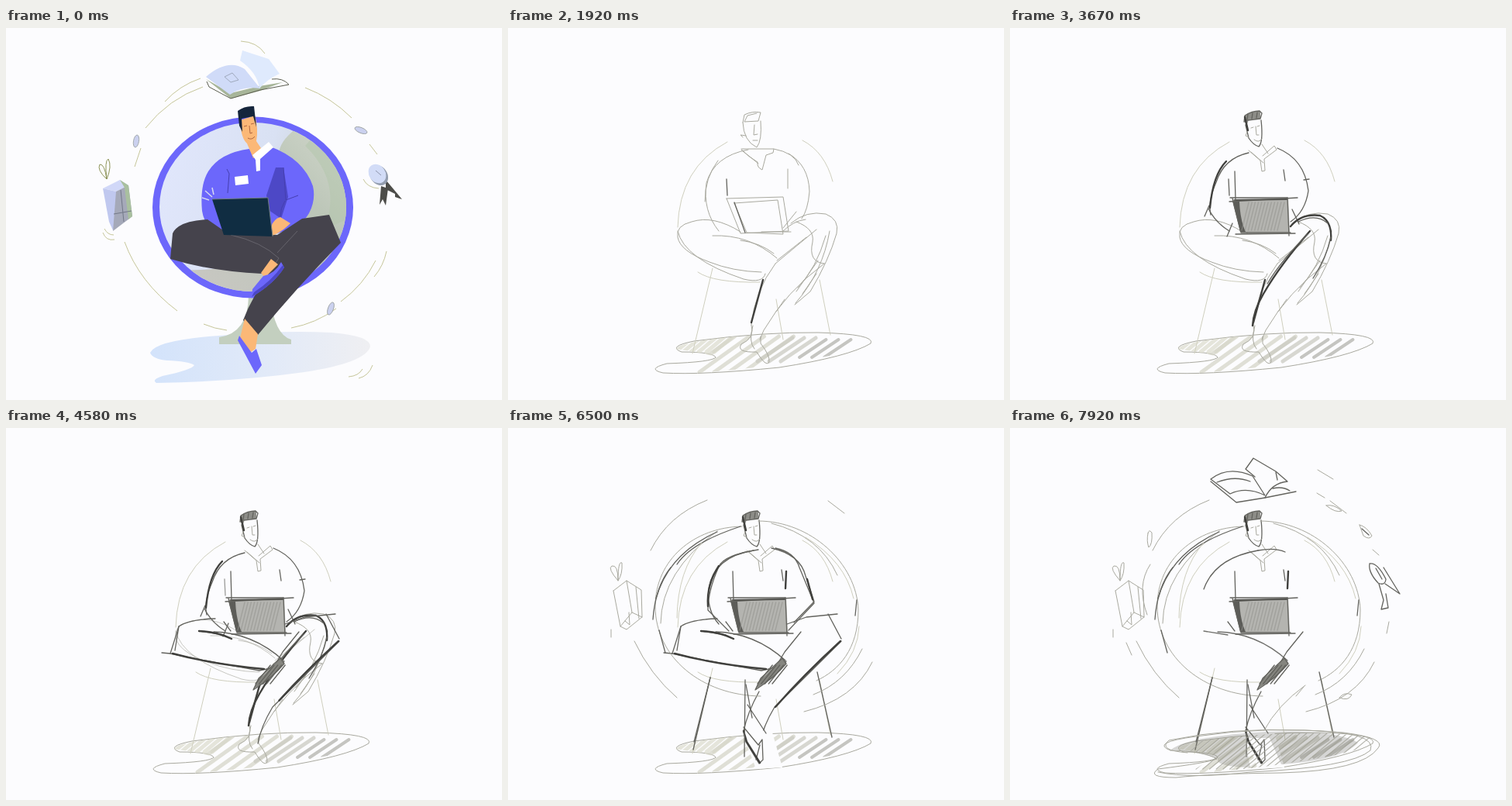
These frames come from a looping animation (640 by 480 pixels, 8 s). An HTML page:

```html
<!DOCTYPE html>
<html lang="en">
<head>
<meta charset="utf-8">
<title>From sketch to illustration</title>
<style>
  html, body { margin: 0; width: 100%; height: 100%; overflow: hidden; background: #fcfcfe; }
  svg { display: block; width: 100%; height: 100%; }
  #sketch path { fill: none; stroke-linecap: round; stroke-linejoin: round; }
  .trail { fill: none; stroke: #c6c69a; stroke-width: 1; }
  .blue { fill: #6c67fb; }
  .skin { fill: #fbb877; }
  .trousers { fill: #45434c; }
</style>
</head>
<body>
<svg viewBox="0 0 640 480">
  <defs>
    <linearGradient id="seatFill" x2="1" y2=".25">
      <stop offset=".1" stop-color="#e0e6fb"/><stop offset=".6" stop-color="#d9e1f3"/><stop offset="1" stop-color="#c9ceca"/>
    </linearGradient>
    <linearGradient id="seatShade" x1="1" y1="0" x2="0" y2="1">
      <stop offset="0" stop-color="#d4d9ce"/><stop offset=".35" stop-color="#bcc6b8"/><stop offset="1" stop-color="#c9c7c3"/>
    </linearGradient>
    <linearGradient id="floorFill">
      <stop offset="0" stop-color="#d3e3fb"/><stop offset=".55" stop-color="#e2eaf8"/><stop offset="1" stop-color="#efeff2"/>
    </linearGradient>
    <clipPath id="floorClip"><path d="M215 414Q225 403 320 396Q400 390 465 399Q470 412 420 422Q330 440 230 446Q250 432 268 424Q245 418 215 414Z"/></clipPath>
    <clipPath id="seatClip"><ellipse cx="318.500" cy="231" rx="120.500" ry="109"/></clipPath>
  </defs>

  <g id="sketch"></g>

  <g id="picture">
    <!-- floor and chair -->
    <path fill="url(#floorFill)" d="M186 419Q193 403 275 397Q350 390 420 393Q470 397 470 411Q464 432 385 444Q300 456 194 458Q187 454 202 449Q240 441 243 435Q235 430 208 429Q189 427 186 419Z"/>
    <path fill="#c3cfbf" d="M313 346Q312 394 275 399V408H368V402Q346 396 341 346Z"/>
    <ellipse class="blue" cx="318.500" cy="231.500" rx="129.500" ry="117"/>
    <ellipse fill="url(#seatFill)" cx="318.500" cy="231" rx="120.500" ry="109"/>
    <g clip-path="url(#seatClip)">
      <path fill="url(#seatShade)" d="M374 130Q335 160 365 190Q400 230 350 275Q300 315 235 312L280 350H450V130Z"/>
      <path fill="#b4c6ae" opacity=".55" d="M386 152Q435 200 410 260L445 245Q445 180 392 145Z"/>
    </g>

    <!-- body -->
    <path class="blue" d="M314 156Q276 161 261 185Q250 203 253 236Q256 254 268 264L345 266Q380 259 391 239Q400 222 396 204Q384 169 341 153L322 170Z"/>
    <path fill="#4d48c6" d="M336 216L348 180H358L364 218L355 246L339 235Z"/>
    <path fill="none" stroke="#453fb0" d="M285 182L288 188L286 213M358 180L361 222L377 216M360 223Q354 232 354 243"/>
    <path fill="#fff" d="M295 192L312 190L313 201L296 203Z"/>
    <path fill="none" stroke="#d6d9f2" stroke-width="1.500" d="M253 219L262 222M257 210L266 218M266 206L268 215"/>
    <path class="trousers" d="M215 265Q222 249 260 247L283 263L350 267L382 246L417 241L432 277Q375 335 325 396L306 377Q318 345 340 318L330 317Q265 314 212 298Z"/>
    <path fill="none" stroke="#66646c" d="M290 267Q330 276 352 297L338 318M376 262L350 290"/>
    <path class="skin" d="M342 298L351 305L334 322L329 316Z"/>
    <path class="blue" d="M355 302L359 309Q346 330 317 347L318 337L332 320Q347 317 355 302Z"/>
    <path fill="#4d48c6" d="M359 309Q346 330 317 347L320 341Q343 326 357 306Z"/>
    <path class="skin" d="M308 375L325 395L322 414L316 418L302 400Z"/>
    <path class="blue" d="M301 397L317 419L323 414L330 435L322 446L299 403Z"/>
    <path class="skin" d="M340 264Q343 247 354 244L367 252Q355 264 343 268Z"/>
    <path fill="#102d42" d="M266 221L338 219L344 269L281 267Z"/>
    <path fill="none" stroke="#6f7c80" d="M266 221L338 219L344 269"/>

    <!-- head -->
    <path class="skin" d="M302 119L321 113Q326 130 323 146L331 158L319 168L311 149Q303 142 302 119Z"/>
    <path fill="#15253c" d="M299 107Q308 100 320 101L323 128L319 114L304 117L305 134L301 126Z"/>
    <path fill="none" stroke="#a85e3d" stroke-width=".9" d="M307 127L311 126M316 124L320 123M314 126L315 136L318 135M312 142Q317 145 321 140"/>
    <path fill="#fff" d="M318 164L339 147L345 154L328 169L328 184L323 185L322 170Z"/>

    <!-- orbiting things -->
    <path class="trail" d="M180 129Q210 91 254 76M205 95Q224 74 251 65M303 17Q324 18 334 33M386 77Q420 90 446 116M469 150L479 163M491 288Q487 307 475 321M477 300Q461 332 432 353M426 362Q400 381 368 387M153 276Q172 328 221 365M255 382Q269 388 285 390M174 155L166 179M125 264Q129 275 140 273M127 259Q131 267 139 267M442 450Q455 449 460 440M455 452Q468 449 473 435M461 195Q466 206 481 207"/>
    <path fill="#a7b599" d="M258 66L290 91L328 81L357 70L327 75L290 84Z"/>
    <path fill="#d0dbf8" d="M258 63Q286 39 308 53L328 78Q304 75 289 86Z"/>
    <path fill="#dfeafd" d="M305 29L339 40L353 59Q337 66 327 78Q324 57 302 42Z"/>
    <path fill="none" stroke="#5a5c4e" d="M259 69L262 76L290 91L328 80L365 73Q357 64 343 66"/>
    <path fill="none" stroke="#9fa9bd" d="M282 63L292 58L300 67L290 70Z"/>
    <path fill="#d1d8f8" d="M125 207L147 196L158 203L142 211Z"/>
    <path fill="#c0c8ef" d="M125 207L142 211L147 238L138 261L133 250Z"/>
    <path fill="#a5a9b9" d="M142 211L158 203L163 243L138 262Z"/>
    <path fill="#a9c09f" d="M147 196L158 203L163 243L158 247L153 206Z"/>
    <path fill="none" stroke="#727888" d="M148 209L152 250M139 240L162 236"/>
    <path fill="none" stroke="#8d9457" d="M130 195Q117 183 121 176Q127 175 130 195Q127 171 132 169Q137 178 130 195"/>
    <path fill="#4d4d49" d="M484 204L493 207L490 229L486 221L482 228ZM490 196L511 221L502 218L502 214L490 208Z"/>
    <ellipse fill="#949eaf" cx="481" cy="190" rx="11" ry="14" transform="rotate(-35 481 190)"/>
    <ellipse fill="#d2dcf7" cx="479" cy="188" rx="10.500" ry="13" transform="rotate(-35 479 188)"/>
    <path stroke="#8e95ab" d="M477 184L484 190"/>
    <g fill="#cbd1ef" stroke="#999f9f" stroke-width=".8">
      <ellipse cx="168" cy="146" rx="3.500" ry="8" transform="rotate(10 168 146)"/>
      <ellipse cx="458" cy="132" rx="8.500" ry="3.500" transform="rotate(22 458 132)"/>
      <ellipse cx="419" cy="362" rx="3.500" ry="8.500" transform="rotate(20 419 362)"/>
    </g>
  </g>
</svg>

<script>
const LOOP = 8000, NEVER = 9000;
const svgNS = 'http://www.w3.org/2000/svg';
const sheet = document.getElementById('sketch');
const picture = document.getElementById('picture');
const parts = [];
const clamp = v => Math.max(0, Math.min(1, v));

const pale = ['#cfcfbe', 1];
const grey = ['#a9a99f', 1];
const dark = ['#63635e', 1.3];
const bold = ['#40403d', 2.4];

function addPath(attributes, part) {
  const node = document.createElementNS(svgNS, 'path');
  for (const name in attributes) node.setAttribute(name, attributes[name]);
  sheet.append(node);
  parts.push({ node, ...part });
}

// Strokes of one group are drawn one after another between start and end.
function sketch(start, end, hide, [stroke, width], d, extra = {}) {
  const strokes = d.match(/M[^M]+/g);
  const slice = (end - start) / strokes.length;
  strokes.forEach((line, i) => addPath(
    { d: line, stroke, 'stroke-width': width, pathLength: 1, 'stroke-dasharray': '1 2', ...extra },
    { start: start + i * slice, span: slice, hide, drawn: true }));
}

function shade(start, end, hide, fill, d) {
  addPath({ d, style: 'fill:' + fill }, { start, span: end - start, hide });
}

// Parallel pencil strokes that lean to the right.
function hatch(x, y, width, height, count, lean = 1.2) {
  let d = '';
  for (let i = 0; i <= count; i++) {
    const left = x + width * i / count;
    d += `M${left} ${y + height}L${left + height * lean} ${y}`;
  }
  return d;
}

// Floor
const onFloor = { 'clip-path': 'url(#floorClip)', opacity: .75 };
const floorLine = 'M268 425Q266 418 224 418Q205 411 240 404Q330 392 400 393Q475 395 468 407Q440 424 350 438Q250 448 200 445Q178 440 205 433Q265 431 268 425';
sketch(1350, 1620, NEVER, grey, floorLine);
sketch(1550, 1750, NEVER, ['#dedecf', 5], hatch(216, 399, 50, 19, 5), onFloor);
sketch(1580, 1800, NEVER, ['#d6d6c8', 5], hatch(228, 398, 76, 46, 4, 1.4), onFloor);
sketch(1680, 1850, NEVER, ['#cbcbc2', 5], hatch(322, 400, 30, 30, 2, 1.5), onFloor);
sketch(1750, 1900, NEVER, ['#b3b3ad', 4], hatch(376, 402, 32, 23, 2, 1.5), onFloor);

// First loose figure
sketch(920, 1100, 2900, grey, 'M303 122Q304 146 321 154Q328 145 326 120M303 141L300 138L307 139M303 122L305 112Q315 107 326 109L323 120L305 121L309 113L321 110M318 125L317 138L322 137M316 145L322 145');
sketch(1040, 1190, 3050, grey, 'M301 156L324 156L343 156L342 161L333 164L328 183Q321 180 322 173Q310 166 301 157L323 175');
sketch(1080, 1250, 3200, grey, 'M310 157Q266 165 256 200Q251 236 272 262M271 171Q254 193 254 224M343 156Q370 161 375 177M362 162Q388 177 389 211Q387 235 379 246M361 182V207');
sketch(1180, 1300, 3100, grey, 'M282 220L355 218L362 262L300 265ZM292 226L348 222L355 266L308 264ZM327 263L365 263M355 262Q368 249 384 247M372 237L355 258');
sketch(1280, 1480, 4500, grey, 'M300 263Q265 241 237 250Q216 255 219 270Q222 288 260 302Q290 314 327 315M264 268Q311 266 347 297M219 262Q227 298 304 324Q329 330 332 317');
sketch(1320, 1520, 4600, grey, 'M365 252Q385 235 410 240Q428 247 424 265Q414 300 390 340L370 357M345 304Q318 340 314 383M408 304Q359 340 330 390L325 402M372 250Q396 259 393 276Q387 302 408 304');
sketch(1500, 1650, 4900, grey, 'M314 383Q319 400 301 408Q294 419 321 418Q333 438 337 431Q338 422 326 407L326 398M316 384Q310 405 318 414');
sketch(1200, 1500, NEVER, pale, 'M283 147Q221 180 219 257M380 145Q409 160 419 198M245 315Q265 329 325 328M264 310L238 420M346 350L355 402M402 325L416 396');
sketch(1700, 1850, 4500, dark, 'M282 195L283 216M292 225L306 264');
sketch(1720, 1850, 4500, grey, 'M345 304L398 260M347 300L385 270M300 274Q325 277 343 291');
sketch(1800, 1920, 4700, bold, 'M329 325Q321 354 314 380');
sketch(1830, 1915, 4600, grey, 'M415 262Q406 315 371 355M410 268Q398 310 374 335M400 300L372 340M357 350L346 366M398 317L380 343');

// Head and laptop
shade(2580, 2750, NEVER, '#8d8d88', 'M302 121L303 113Q313 107 323 107L323 117L308 118L306 124Z');
sketch(2580, 2850, NEVER, dark, 'M302 121L303 113Q312 107 322 107L325 110L323 117L307 119M304 125L308 142Q314 151 321 153Q327 147 324 119M307 111L306 119M313 110L312 117M319 109L318 116');
sketch(2600, 2750, NEVER, bold, 'M303 115L307 132');
sketch(2800, 2980, NEVER, grey, 'M311 129L314 128M319 127L322 126M317 127L318 138L321 138M315 144Q321 149 325 143M306 134L304 139L308 141M325 150L333 162');
sketch(2900, 3080, NEVER, grey, 'M308 158L323 171L325 185L329 184L328 169L344 157L341 152L326 165M311 160L327 174');
shade(3030, 3270, NEVER, '#b4b4b0', 'M287 221L359 220L361 264L298 264Z');
shade(3100, 3300, NEVER, '#5c5c58', 'M287 223L297 263L304 263Q297 248 296 224Z');
sketch(3000, 3300, NEVER, dark, 'M284 219L358 219M283 224L371 219M287 220L298 264L362 264M358 219L360 268M291 266L368 265');
sketch(3150, 3330, NEVER, ['#555551', 2], 'M290 222L357 221');
sketch(3150, 3320, NEVER, ['#92928e', 1.3], hatch(299, 225, 46, 36, 11, .25), { opacity: .6 });

// Darker outlines
sketch(3100, 3420, 4800, dark, 'M308 161Q276 168 266 199Q255 224 259 241M256 233Q265 251 283 262M345 155Q380 169 385 210Q381 237 362 250M364 234L373 253M379 196L386 195M257 229L251 243M287 252L280 269');
sketch(3200, 3400, 4800, bold, 'M279 172Q262 189 258 232');
sketch(3300, 3450, NEVER, dark, 'M290 185L291 222M353 183L355 197');
sketch(3350, 3600, 4650, bold, 'M362 256Q376 239 400 242Q416 249 414 274M387 262Q349 305 327 343Q314 365 313 384');
sketch(3450, 3620, 4650, dark, 'M414 270Q409 295 391 323M372 250Q395 239 410 252M384 266Q350 300 332 330');
sketch(3750, 4200, 7650, dark, 'M270 246Q235 247 223 256L212 291L201 290M212 291Q270 303 327 313Q350 309 359 301M223 256L218 287');
sketch(3900, 4220, 7900, dark, 'M268 263Q318 264 358 300M250 262L281 267');
sketch(4150, 4300, 7650, bold, 'M215 291Q267 305 333 311M249 262Q273 263 291 272');
sketch(4220, 4550, 7650, dark, 'M360 253L385 244L425 240M413 240L430 272M430 275Q385 320 344 360Q329 385 325 407');
sketch(4400, 4600, 7650, bold, 'M429 275Q381 319 345 360');
sketch(4000, 4300, NEVER, dark, 'M378 263L357 289L348 304M281 250L290 262');
shade(4350, 4500, NEVER, '#85857f', 'M354 297L359 304L339 324L319 337L326 325Z');
sketch(4300, 4550, NEVER, dark, 'M354 297L359 304Q344 322 319 338L326 323Z' + hatch(322, 306, 19, 24, 4, .8));
shade(4720, 4850, NEVER, '#fcfcfe', 'M303 394L340 389L354 438L320 440Z');
sketch(4650, 4980, NEVER, dark, 'M324 340Q309 367 304 391L307 405L324 433L329 428L328 402L323 409L304 386M309 357L333 394M325 409L320 428');
sketch(4800, 4980, NEVER, bold, 'M304 391L308 405L325 432');
sketch(4600, 4850, 7600, dark, 'M323 157Q278 164 272 179Q258 210 258 235L285 262M345 155Q370 160 376 180L395 226L362 261');
sketch(4800, 4990, 5900, bold, 'M273 175L295 166M265 198L256 226M369 164L382 194L380 184M389 211L395 227L361 259');
sketch(5850, 6150, 7600, dark, 'M317 158Q266 166 259 207Q256 235 272 253M340 155Q377 163 384 191L395 224L369 251');
sketch(6000, 6200, 7550, bold, 'M272 178Q256 202 258 230M386 195L393 221');
sketch(6000, 6150, NEVER, bold, 'M359 185L358 207');
sketch(4950, 5100, NEVER, dark, 'M261 322L239 415');

// Chair shell
sketch(5080, 5320, 5850, grey, 'M201 175Q230 108 287 84Q343 66 367 93M201 175Q256 110 350 107C430 107 478 145 478 205C476 285 425 360 330 363C250 362 183 305 183 235Q184 202 201 175M201 276Q204 266 215 262');
sketch(5650, 5950, NEVER, grey, 'M302 127C240 128 190 170 190 230C190 296 250 345 326 346M323 120C390 120 450 174 452 235C452 285 427 313 398 326M197 252Q198 185 270 133M340 123Q402 139 425 190');
sketch(5900, 6150, NEVER, dark, 'M191 220Q207 162 270 134M187 247Q190 205 210 180M218 176Q236 148 300 127M195 261L203 290M450 222L448 242');
sketch(6150, 6350, NEVER, dark, 'M261 322L240 405M399 315L418 399M306 325L305 424M307 331L315 374');
sketch(6100, 6250, NEVER, pale, 'M250 148Q219 183 218 245M384 141Q435 172 446 220M453 256Q452 289 425 317');

// Orbit and bag
sketch(5500, 5950, NEVER, grey, 'M184 158Q206 113 257 93M413 94L434 110M163 275Q184 319 218 348M470 302Q447 350 382 366M457 285Q436 328 394 344');
sketch(5750, 6250, NEVER, grey, 'M136 210L153 197L172 209L173 244L153 260L145 256L136 210M153 197L160 238L145 256M160 238L173 244M165 205L169 246M156 238L157 254L151 249M142 197Q128 181 134 178Q142 176 142 197Q142 171 147 174Q148 189 142 197M133 260V270');

// Book, medal and leaves
sketch(6600, 6950, NEVER, dark, 'M259 66Q282 48 313 62L329 87Q305 75 284 85ZM259 69L292 96L329 90M316 63L304 53L314 39L343 56L358 69Q338 71 329 90L369 82M343 57L345 67M267 70Q290 61 310 69M339 78Q352 75 361 81');
sketch(6950, 7250, NEVER, dark, 'M464 175Q474 173 485 195Q484 204 475 200Q462 186 464 175M472 181L480 195M482 180L503 214L484 201M476 201L482 222L479 234L488 232L485 214');
sketch(7150, 7450, NEVER, grey, 'M178 136Q179 130 183 135Q184 150 179 154Q176 146 178 136M451 125Q460 127 467 139Q464 145 456 139ZM408 100Q418 98 428 107Q420 110 408 100M425 348Q431 340 441 344Q437 353 425 348M397 54L417 66M396 84L406 90M468 157L476 164M150 277L157 293M489 250L486 265');
sketch(7100, 7150, NEVER, dark, 'M454 130L463 138');

// Closing touches
sketch(7500, 7650, NEVER, dark, 'M320 158Q264 168 250 208M320 158Q342 154 355 160');
sketch(7550, 7700, NEVER, grey, 'M328 390Q345 358 381 332M369 346L379 334M181 176Q163 203 177 241');
sketch(7500, 7850, NEVER, grey, 'M207 416Q180 406 240 398Q330 384 430 393Q486 400 475 413Q455 442 350 445Q260 446 214 451Q175 451 191 440Q255 432 267 427Q250 417 207 416M229 419Q190 416 205 403Q285 386 380 390Q475 392 465 416Q440 438 310 444Q235 453 191 444');
shade(7550, 7850, NEVER, 'rgba(125,125,115,.3)', 'M208 415Q230 398 330 392Q420 389 449 406Q430 428 350 434L335 400L303 400L310 438Q265 437 268 427Q250 418 208 415Z');
sketch(7550, 7900, NEVER, ['#a0a096', 1.2], hatch(205, 394, 210, 46, 24), onFloor);

function render(time) {
  picture.setAttribute('opacity', clamp(1 - (time - 80) / 720));
  for (const { node, start, span, hide, drawn } of parts) {
    const progress = clamp((time - start) / span);
    const visible = clamp(1 - (time - hide) / 220);
    node.style.display = progress && visible ? '' : 'none';
    if (drawn) node.style.strokeDashoffset = 1 - progress;
    node.style.strokeOpacity = visible;
    node.style.fillOpacity = drawn ? 0 : progress * visible;
  }
}

function tick() {
  render(performance.now() % LOOP);
  requestAnimationFrame(tick);
}
tick();
</script>
</body>
</html>
```
